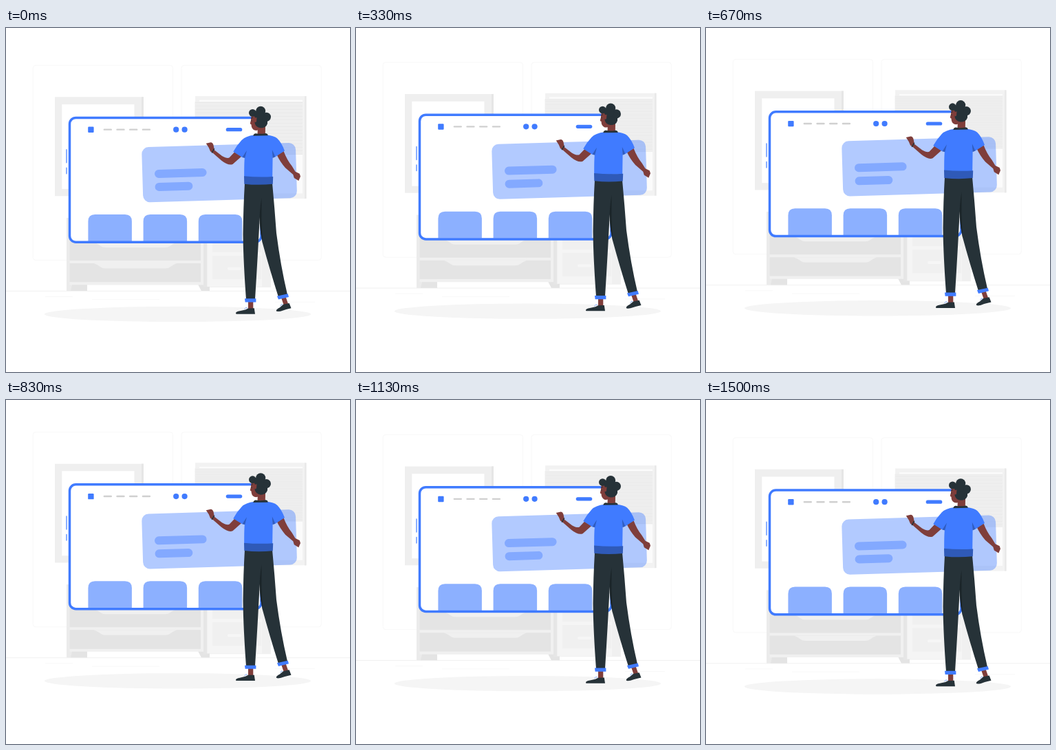
An HTML page for the animation above (1.54 s loop, 500 px wide and 500 px high).

```html
<!DOCTYPE html>
<html lang="en">
<head>
<meta charset="utf-8">
<title>Floating web page scene</title>
<style>
html, body { margin: 0; width: 100%; height: 100%; overflow: hidden; background: #fff; }
svg { display: block; width: 100vw; height: 100vh; }
.ink { fill: #263238; }
.skin { fill: #7f3e3b; }
.blue { fill: #407bff; }
</style>
</head>
<body>
<svg viewBox="0 0 500 500" xmlns="http://www.w3.org/2000/svg">
<g id="scene">
  <!-- room -->
  <g fill="none" stroke="#f8f8f8">
    <rect x="39.2" y="54.3" width="203.3" height="283.2" rx="4"/>
    <rect x="255" y="54.3" width="203.3" height="283.2" rx="4"/>
    <path d="M0 382.4H500" stroke="#f1f1f1"/>
    <path d="M57 390.5H97M125 394.7H223M391 398.3H449" stroke="#f8f8f8"/>
  </g>

  <!-- picture -->
  <path d="M71 100.3H200V244.2H71Z" fill="#efefef"/>
  <path d="M197 100.3H200V244.2H197Z" fill="#e6e6e6"/>
  <path d="M81.3 111H186.5V234H81.3Z" fill="#fff"/>

  <!-- window with blinds -->
  <path d="M275 99H436.5V248H275Z" fill="#f2f2f2"/>
  <path d="M434 99H436.5V248H434Z" fill="#e9e9e9"/>
  <path d="M281 104.7H431V240.5H281Z" fill="#fbfbfb"/>
  <path d="M274.5 107H431V184H274.5Z" fill="#f0f0f0"/>
  <g id="slats" stroke="#e9e9e9" stroke-width=".8"></g>

  <!-- cabinet -->
  <path d="M88 276H385V377H293L296 382H284L279.5 373.5H118V382H88Z" fill="#f0f0f0"/>
  <path d="M88 276H92.5V373.5H118V382H88Z" fill="#ebebeb"/>
  <path d="M96 373.5H118V382H94Z" fill="#e4e4e4"/>
  <path d="M279.5 373.5H287V376H296V382H284Z" fill="#e4e4e4"/>
  <path d="M92.5 283H283V338H92.5ZM92.5 342H283V369.3H92.5Z" fill="#e4e4e4"/>
  <path id="grip" d="M128 342H248Q243 344 239 347Q236 349.5 231 349.5H145Q140 349.5 137 347Q133 344 128 342Z" fill="#f0f0f0"/>
  <use href="#grip" y="-30.5"/>
  <path d="M287 276H292.5V377H287Z" fill="#e6e6e6"/>
  <path d="M292.5 276H372V376H292.5Z" fill="#f5f5f5"/>
  <path d="M300 290H371V326H300ZM300 331H371V365H300Z" fill="#f0f0f0"/>
  <path d="M324 349.8H340" stroke="#f6f6f6" stroke-width="4" stroke-linecap="round"/>

  <ellipse cx="249.5" cy="416" rx="193.7" ry="11.2" fill="#f5f5f5"/>

  <!-- screen -->
  <path d="M88 177V195.5M88 203.5V211.5" stroke="#8cb0ff" stroke-width="2" stroke-linecap="round"/>
  <rect x="92.5" y="130.5" width="278.5" height="180.8" rx="9" fill="#fff"/>
  <g id="cards" fill="#8cb0ff"></g>
  <rect x="92.5" y="130.5" width="278.5" height="180.8" rx="9" fill="none" stroke="#407bff" stroke-width="3.5"/>
  <g class="blue">
    <rect x="119.2" y="143.6" width="8.4" height="8.4" rx="1.2"/>
    <circle cx="247.2" cy="147.7" r="4.1"/>
    <circle cx="259.6" cy="147.7" r="4.1"/>
    <rect x="319.7" y="145.1" width="23.6" height="5.2" rx="2.6"/>
  </g>
  <path d="M142.8 147.7h10m8.7 0h10m8.7 0h10m8.7 0h10" stroke="#d0d0d0" stroke-width="2.4" stroke-linecap="round"/>

  <!-- banner -->
  <g transform="rotate(-1.7 310 210)">
    <rect x="198.2" y="170" width="223.8" height="80.2" rx="10" class="blue" opacity=".4"/>
    <path d="M222 209.3H285.6M222 228.4H264.8" stroke="#407bff" stroke-opacity=".42" stroke-width="12" stroke-linecap="round"/>
  </g>

  <!-- arms -->
  <path class="skin" d="M334 178.5L324.5 188.5Q321 190 314 186L303 177.5L301.5 170Q300.5 166.5 297.5 166.3L290.8 167.8L294.8 174L297 179.3L301 182L313 192.5Q323 200.5 329.5 198L343 186Z"/>
  <path d="M302.8 175.5L299.2 181.5" stroke="#263238" stroke-width="1.5"/>
  <path class="skin" d="M393.5 184L403.5 179Q408.5 192 415.5 200.5L420.5 208.7L426.7 211.7L428 215.7L425.3 222L418.8 218L417.3 213L406 203.3Q398 194 393.5 184Z"/>

  <!-- feet -->
  <path class="skin" d="M352 397H359.3V409H352ZM400 392L406.5 390.5L410.3 401.5L404 403.5Z"/>
  <path class="ink" d="M334 414.6Q334.3 412 340 411.3L348 409.5L352 407.5L360.8 407.3L362 415.7H335Q334 415.5 334 414.6ZM392.7 411Q392.8 408.7 398 406.2L403 401.8L411.7 400L414.5 407.3Q405 409.3 399 411.7Q393 412.8 392.7 411Z"/>
  <path d="M346.5 408.8Q348 405 351 407M399 404.5Q399.5 400.5 402.3 402" fill="none" stroke="#8cb0ff" stroke-width="1"/>

  <!-- trousers -->
  <path class="ink" d="M347 225H387Q390.5 263 393 298Q399 345 409 387.5L396 391Q383 350 373 313Q369 296 368.8 275Q366 330 362 394.5H349Q345 340 344.5 300Q345 260 347 225Z"/>
  <path d="M371.5 247Q368 268 368.8 284Q369.5 298 373 313Q370.5 280 371.5 247Z" fill="#1a2428"/>
  <path class="blue" d="M347 393.3H363.4V398.5H347.6ZM394 389.8L409.7 386.4L411 391L396 394.6Z"/>

  <!-- shirt -->
  <path class="blue" d="M361 155.5Q348 157 342.5 163Q335 171 330.3 179.8L343.2 188L347.5 182.5Q346 192 346.2 217H387.2L387.7 182L391.5 187.3L405 178.6Q400.5 166.5 394 160.3Q389 156.5 379.5 155.5Z"/>
  <path d="M343.2 188L350 178L347.2 189ZM391.5 187.3L386.8 177L387.5 189Z" fill="#2f5cc0"/>
  <path d="M346 215.3Q367 217.3 388.2 216L387.8 226.8Q367 229 346.3 226.7Z" fill="#2f5ab8"/>

  <!-- head -->
  <path class="skin" d="M366 142H377L376.8 154.5H365.5Z"/>
  <path class="ink" d="M359.3 156.7Q360 153.2 363 153.2Q370 154.6 377.5 153Q380.5 153.5 380.7 156.3Z"/>
  <path class="skin" d="M357 127Q355.8 131 356 134L354.8 138.5Q355 140 356.5 140.2Q356.5 146.5 361 148.5Q366 150 371 146L372 128Z"/>
  <path class="ink" d="M366 131Q362 133 361.5 138Q363 144.5 370 145.3Q378 145.5 380 139V128H366Z"/>
  <g class="ink">
    <circle cx="358.4" cy="123.4" r="5.4"/>
    <circle cx="370.2" cy="120.8" r="7"/>
    <circle cx="378.4" cy="129.3" r="6.6"/>
    <circle cx="368" cy="126.5" r="7.2"/>
  </g>
  <path class="skin" d="M364.5 130Q359.5 130.5 360.8 135Q362.3 138.5 364 136Z"/>
  <path d="M356.2 131.3L359 130.3M357 134v1.6" stroke="#263238" stroke-width="1" fill="none"/>
</g>
</svg>
<script>
const FPS = 24, FRAMES = 37, LOOP = 1540;
const LOW = 1480, HALF = LOOP / 2, RISE = 10, REST = 0.75;
const get = id => document.getElementById(id);

let slats = "";
for (let y = 108.5; y < 184; y += 2.5) slats += `<path d="M275 ${y}H431"/>`;
get("slats").innerHTML = slats;

get("cards").innerHTML = [119.4, 199.6, 279.8].map(x =>
  `<path d="M${x} 310V281q0-10 10-10h43.5q10 0 10 10V310z"/>`).join("");

// linear rise and fall, lowest at LOW
function lift(t) {
  const p = ((t - LOW) % LOOP + LOOP) % LOOP;
  return REST - RISE * (1 - Math.abs(p - HALF) / HALF);
}

const scene = get("scene");
const start = performance.now();
function draw(now) {
  const t = Math.max(0, now - start) % LOOP;
  const step = Math.min(FRAMES - 1, Math.floor((t + 5) * FPS / 1000));
  scene.setAttribute("transform", `translate(0 ${lift(step * 1000 / FPS).toFixed(3)})`);
  requestAnimationFrame(draw);
}
draw(start);
</script>
</body>
</html>
```
